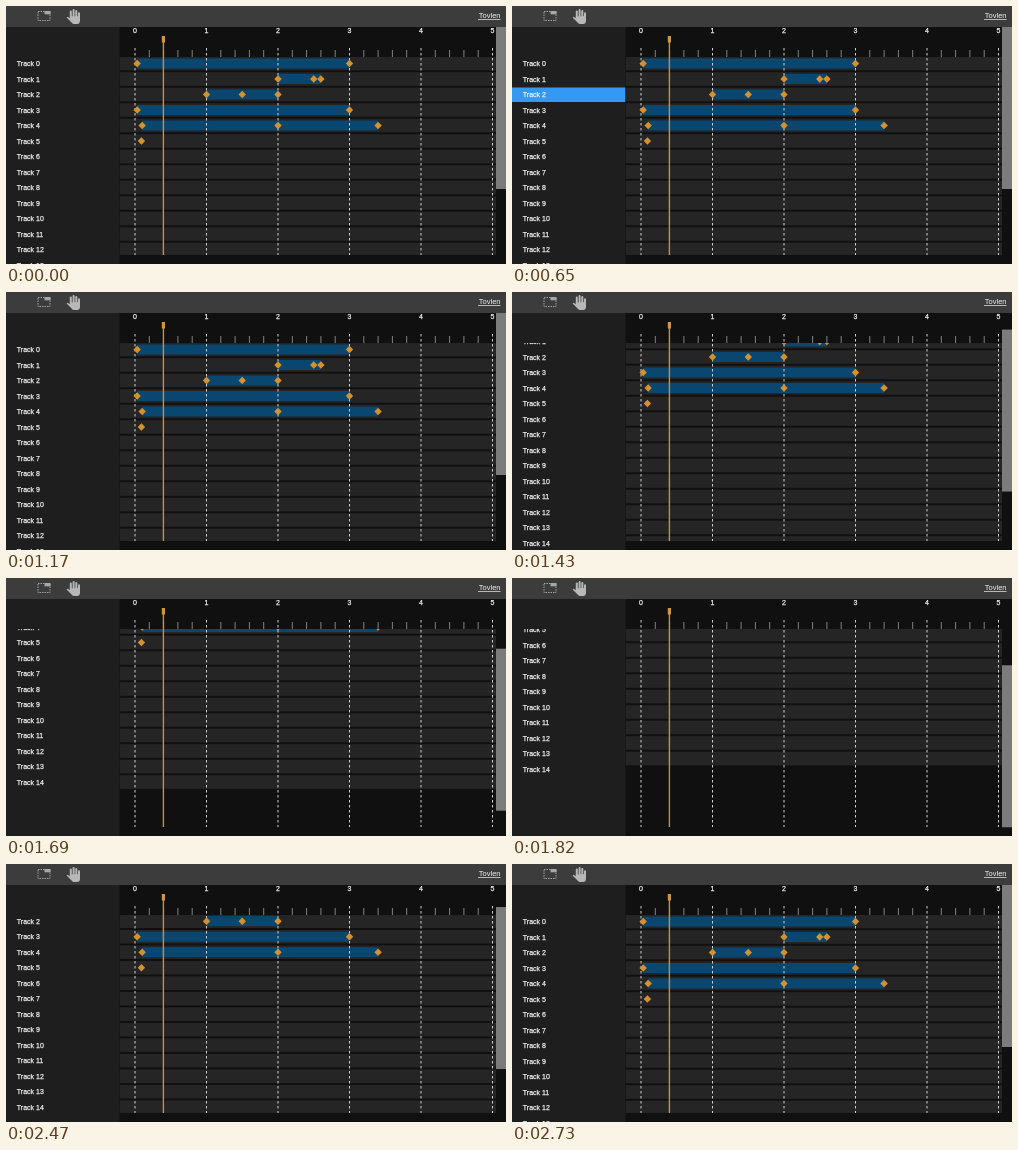
These frames come from a looping animation (500 by 258 pixels, 3380 ms). An HTML page with a canvas:

```html
<!DOCTYPE html>
<html lang="en">
<head>
<meta charset="utf-8">
<title>Keyframe timeline</title>
<style>
  html, body { margin: 0; width: 100%; height: 100%; overflow: hidden; background: #101010; }
  canvas { display: block; width: 500px; height: 258px; }
</style>
</head>
<body>
<canvas id="stage" width="500" height="258"></canvas>
<script>
const ctx = document.getElementById('stage').getContext('2d');
const W = 500, H = 258, LOOP = 3380, STEP = 130;
const PANEL = 113.5, BAR_X = 490, TOP = 21, HEAD = 51, FLOOR = 249;
const ROW = 15.5, FIRST = 57.5, ROWS = 15, LABEL_MAX = 83.5;
const FONT = 'Arial, "Liberation Sans", sans-serif';

// Keyframe times in seconds, one list per track
const tracks = [
  [0.03, 3],
  [2, 2.5, 2.6],
  [1, 1.5, 2],
  [0.03, 3],
  [0.1, 2, 3.4],
  [0.09]
];

const timeX = s => 129 + s * 71.5;
const rowY = (i, scroll) => FIRST + i * ROW - scroll;

function rect(x, y, w, h, color) {
  ctx.fillStyle = color;
  ctx.fillRect(x, y, w, h);
}

function text(str, x, y, size, align = 'left', weight = 0.25) {
  ctx.font = size + 'px ' + FONT;
  ctx.textAlign = align;
  ctx.fillStyle = ctx.strokeStyle = '#f0f0f0';
  ctx.lineWidth = weight;
  ctx.fillText(str, x, y);
  if (weight) ctx.strokeText(str, x, y);
}

function clipped(x, y, w, h, draw) {
  ctx.save();
  ctx.beginPath();
  ctx.rect(x, y, w, h);
  ctx.clip();
  draw();
  ctx.restore();
}

function line(x, y1, y2, color, width) {
  ctx.strokeStyle = color;
  ctx.lineWidth = width;
  ctx.beginPath();
  ctx.moveTo(x, y1);
  ctx.lineTo(x, y2);
  ctx.stroke();
}

function diamond(x, y, r = 3.7) {
  ctx.beginPath();
  ctx.moveTo(x, y - r);
  ctx.lineTo(x + r, y);
  ctx.lineTo(x, y + r);
  ctx.lineTo(x - r, y);
  ctx.closePath();
  ctx.fillStyle = '#d6912c';
  ctx.fill();
}

function scrollAt(t) {
  const tick = start => Math.floor((t - start) / STEP);
  if (t < 1430) return 0;
  if (t < 2340) return Math.min(94, 23.5 * (tick(1430) + 1));
  return Math.max(0, 47 - 15.7 * tick(2340));
}

function hoverAt(t) {
  return t >= 650 && t < 1170 ? 2 + 3 * Math.floor((t - 650) / STEP) : -1;
}

function drawHand() {
  ctx.fillStyle = '#b8b8b8';
  ctx.lineCap = 'round';
  const fingers = [[64.8, 5.6], [67.6, 4], [70.3, 5], [73, 7.2]];
  for (const [x, y] of fingers) line(x, y, 12, '#b8b8b8', 2);
  ctx.beginPath();
  ctx.moveTo(63.8, 10.5);
  ctx.lineTo(74, 10);
  ctx.lineTo(74, 15);
  ctx.quadraticCurveTo(73.8, 18, 71.1, 18);
  ctx.lineTo(68.1, 18);
  ctx.quadraticCurveTo(66.8, 18, 65.8, 16.8);
  ctx.lineTo(60.6, 11.6);
  ctx.lineTo(61.6, 10.7);
  ctx.lineTo(64, 12.2);
  ctx.fill();
  ctx.lineCap = 'butt';
}

function drawToolbar() {
  rect(0, 0, W, TOP, '#3c3c3c');
  ctx.strokeStyle = '#a0a0a0';
  ctx.lineWidth = 1;
  ctx.setLineDash([1.5, 1]);
  ctx.strokeRect(32, 5.5, 12, 9);
  ctx.setLineDash([]);
  rect(38.5, 5, 6, 3.3, '#a8a8a8');
  drawHand();
  text('Tovlen', 494.5, 12, 7.5, 'right', 0);
  rect(472, 13, 22.5, 0.8, '#d8d8d8');
}

function drawLabels(scroll, hover) {
  rect(0, TOP, PANEL, H - TOP, '#1e1e1e');
  clipped(0, HEAD, PANEL, H - HEAD, () => {
    for (let i = 0; i < ROWS; i++) {
      const y = rowY(i, Math.min(scroll, LABEL_MAX));
      if (i === hover) rect(0, y - 7, PANEL, 14.5, '#3399f5');
      text('Track ' + i, 10.8, y + 2.5, 7);
    }
  });
}

function drawRows(scroll) {
  for (let i = 0; i < ROWS; i++) {
    const y = rowY(i, scroll), keys = tracks[i];
    rect(PANEL, y - 6.8, BAR_X - PANEL, 13.6, '#252526');
    if (!keys) continue;
    const x = timeX(keys[0]);
    rect(x, y - 5, timeX(keys[keys.length - 1]) - x, 10, '#094771');
  }
}

function drawRuler() {
  for (let i = 0; i <= 25; i++) {
    const x = timeX(i / 5);
    if (i % 5) {
      line(x, 44, HEAD, '#a0a0a0', 0.8);
    } else {
      ctx.setLineDash([2.5, 2.5]);
      line(x, 42, FLOOR, '#d0d0d0', 1);
      ctx.setLineDash([]);
      text(String(i / 5), x, 27, 7, 'center');
    }
  }
}

function drawTimeline(scroll) {
  const wide = BAR_X - PANEL;
  rect(PANEL, TOP, W - PANEL, H - TOP, '#101010');
  clipped(PANEL, HEAD, wide, FLOOR - HEAD, () => drawRows(scroll));
  clipped(PANEL, TOP, wide, FLOOR - TOP, drawRuler);
  clipped(PANEL, HEAD, wide, FLOOR - HEAD, () => {
    tracks.forEach((keys, i) => keys.forEach(s => diamond(timeX(s), rowY(i, scroll))));
  });
  line(157.4, 30, FLOOR, '#d18c3a', 1.4);
  rect(155.8, 30, 3.2, 6.5, '#cf963c');
  rect(BAR_X, TOP + scroll * 0.705, W - BAR_X, 162, '#7c7c7c');
}

function frame(now) {
  const t = now % LOOP, scroll = scrollAt(t);
  ctx.clearRect(0, 0, W, H);
  drawTimeline(scroll);
  drawLabels(scroll, hoverAt(t));
  drawToolbar();
}

const start = performance.now();
function loop() {
  frame(performance.now() - start);
  requestAnimationFrame(loop);
}
loop();
</script>
</body>
</html>
```
